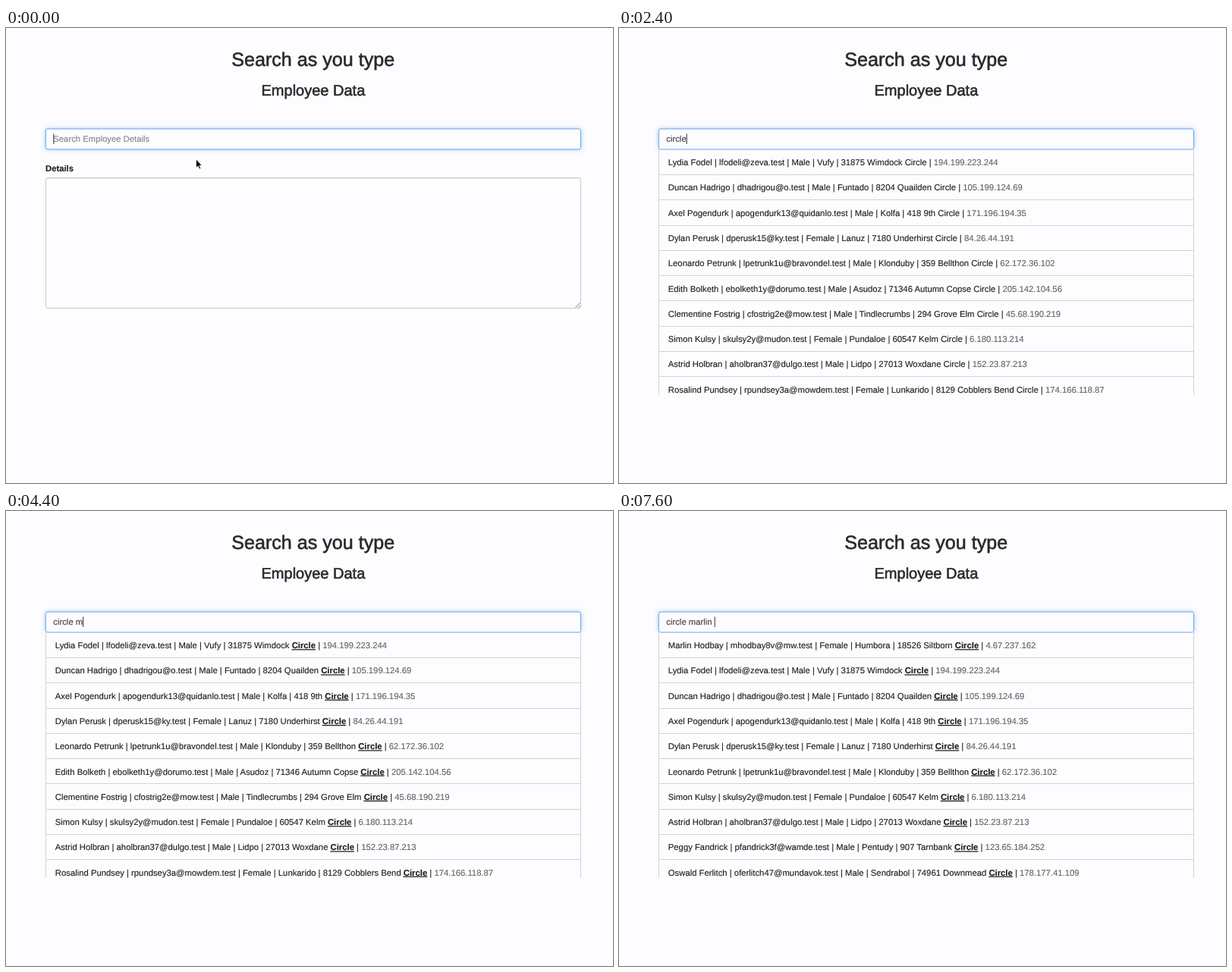
Animation, 800 px wide and 600 px high, one loop 8000 ms. Source, as an HTML page:

```html
<!DOCTYPE html>
<html lang="en">
<head>
<meta charset="utf-8">
<title>Search as you type</title>
<style>
  html, body { margin: 0; width: 100%; height: 100%; overflow: hidden; background: #fdfcff; }
  .box { position: absolute; left: 52px; width: 706px; box-sizing: border-box; border-radius: 3px; }
  #glow { top: 133px; height: 27px; box-shadow: 0 0 6px rgba(102, 175, 233, .6); }
  #area {
    top: 197px; height: 173px; border: 1px solid #c9c8cb;
    box-shadow: inset 0 1px 1px rgba(0, 0, 0, .08);
  }
  svg { position: absolute; left: 0; top: 0; }
  text {
    font: 11.3px "Liberation Sans", Arial, sans-serif;
    fill: #1d1d1f; stroke: #1d1d1f; stroke-width: .12px;
    white-space: pre; text-rendering: geometricPrecision;
  }
  .head { text-anchor: middle; fill: #29282b; stroke: #29282b; stroke-width: .6px; }
  .bold { font-weight: bold; }
  .hit { font-weight: bold; text-decoration: underline; }
  .ip { fill: #626164; stroke: #626164; }
  #hint { fill: #858488; stroke: #858488; }
  #query { fill: #3f3e42; stroke: #3f3e42; }
  #field { fill: none; stroke: #66a5e2; }
  .rule { stroke: #d3d2d5; fill: none; }
</style>
</head>
<body>
<div class="box" id="area"></div>
<div class="box" id="glow"></div>
<svg width="800" height="600" viewBox="0 0 800 600">
  <defs><clipPath id="fold"><rect x="50" y="160" width="710" height="324"/></clipPath></defs>
  <text class="head" x="404.7" y="50" style="font-size:25.1px">Search as you type</text>
  <text class="head" x="404.9" y="88.5" style="font-size:20px">Employee Data</text>
  <text class="bold" x="52" y="188.5">Details</text>
  <path d="M750.5 368.5l6-6M754 368.5l2.5-2.5" stroke="#77767a" stroke-width=".9"/>
  <g id="plain" clip-path="url(#fold)"></g>
  <g id="marked" clip-path="url(#fold)"></g>
  <g id="ranked" clip-path="url(#fold)"></g>
  <rect id="field" x="52.4" y="133" width="705.1" height="27" rx="2.6"/>
  <text id="hint" x="62.3" y="150.3">Search Employee Details</text>
  <text id="query" x="62.3" y="150.3"></text>
  <rect id="caret" y="139.5" width="1" height="13.5" fill="#2e2d30"/>
  <path id="mouse" d="M250.6 173v11.3l2.5-2.4 1.8 4.1 1.8-.8-1.8-3.9h3.3z"
    fill="#000" stroke="#fff" stroke-width=".7"/>
</svg>
<script>
const LOOP = 8000;
const $ = id => document.getElementById(id);

// name | email | gender | company | street | address
const people = [
  'Lydia Fodel|lfodeli@zeva.test|Male|Vufy|31875 Wimdock|194.199.223.244',
  'Duncan Hadrigo|dhadrigou@o.test|Male|Funtado|8204 Quailden|105.199.124.69',
  'Axel Pogendurk|apogendurk13@quidanlo.test|Male|Kolfa|418 9th|171.196.194.35',
  'Dylan Perusk|dperusk15@ky.test|Female|Lanuz|7180 Underhirst|84.26.44.191',
  'Leonardo Petrunk|lpetrunk1u@bravondel.test|Male|Klonduby|359 Bellthon|62.172.36.102',
  'Edith Bolketh|ebolketh1y@dorumo.test|Male|Asudoz|71346 Autumn Copse|205.142.104.56',
  'Clementine Fostrig|cfostrig2e@mow.test|Male|Tindlecrumbs|294 Grove Elm|45.68.190.219',
  'Simon Kulsy|skulsy2y@mudon.test|Female|Pundaloe|60547 Kelm|6.180.113.214',
  'Astrid Holbran|aholbran37@dulgo.test|Male|Lidpo|27013 Woxdane|152.23.87.213',
  'Rosalind Pundsey|rpundsey3a@mowdem.test|Female|Lunkarido|8129 Cobblers Bend|174.166.118.87',
  'Marlin Hodbay|mhodbay8v@mw.test|Female|Humbora|18526 Siltborn|4.67.237.162',
  'Peggy Fandrick|pfandrick3f@wamde.test|Male|Pentudy|907 Tarnbank|123.65.184.252',
  'Oswald Ferlitch|oferlitch47@mundavok.test|Male|Sendrabol|74961 Downmead|178.177.41.109'
];
const firstTen = [...people.keys()].slice(0, 10);
const lists = {
  plain: firstTen,
  marked: firstTen,
  ranked: [10, 0, 1, 2, 3, 4, 7, 8, 11, 12]
};

const PITCH = 33.28;
function row(person, i, hit) {
  const parts = person.split('|');
  const ip = parts.pop();
  return `<text x="64.8" y="${181.2 + PITCH * i}">${parts.join(' | ')} ` +
    `<tspan class="${hit ? 'hit' : ''}">Circle</tspan> | <tspan class="ip">${ip}</tspan></text>` +
    `<path class="rule" d="M52 ${Math.round(193 + PITCH * i) + .5}H758"/>`;
}
for (const [id, order] of Object.entries(lists)) {
  $(id).innerHTML = '<rect x="52" y="160" width="706" height="324" fill="#fdfcff"/>' +
    order.map((n, i) => row(people[n], i, id !== 'plain')).join('') +
    '<path class="rule" d="M52.5 160V484M757.5 160V484"/>';
}

// start time, typed text, caret on, visible list
const steps = [
  [0, '', 1], [200, '', 0], [800, '', 1], [1400, '', 0],
  [1600, 'c', 1], [1800, 'cir', 1, 'plain'], [2000, 'circ', 1, 'plain'],
  [2200, 'circl', 1, 'plain'], [2400, 'circle', 1, 'plain'],
  [2800, 'circle', 0, 'plain'], [3400, 'circle', 1, 'plain'],
  [3600, 'circle ', 1, 'plain'], [4000, 'circle ', 1, 'marked'],
  [4200, 'circle m', 1, 'marked'], [4600, 'circle ma', 1, 'ranked'],
  [4800, 'circle mar', 1, 'ranked'], [5000, 'circle marl', 1, 'ranked'],
  [5400, 'circle marli', 1, 'ranked'], [5600, 'circle marlin', 1, 'ranked'],
  [6200, 'circle marlin', 0, 'ranked'], [6600, 'circle marlin ', 1, 'ranked'],
  [7000, 'circle marlin ', 0, 'ranked'], [7600, 'circle marlin ', 1, 'ranked']
];
const show = (id, on) => $(id).setAttribute('visibility', on ? 'visible' : 'hidden');

let current;
function draw() {
  const t = performance.now() % LOOP;
  const step = steps.findLast(s => s[0] <= t);
  $('mouse').setAttribute('opacity', Math.max(0, 1 - Math.floor(t / 200) / 3));
  if (step !== current) {
    current = step;
    const [, typed, caretOn, list] = step;
    $('query').textContent = typed.replace(/ /g, '\u00a0');
    $('caret').setAttribute('x', 62.3 + (typed ? $('query').getComputedTextLength() : 0));
    show('caret', caretOn);
    show('hint', !typed);
    for (const id in lists) show(id, id === list);
  }
  requestAnimationFrame(draw);
}
draw();
</script>
</body>
</html>
```
